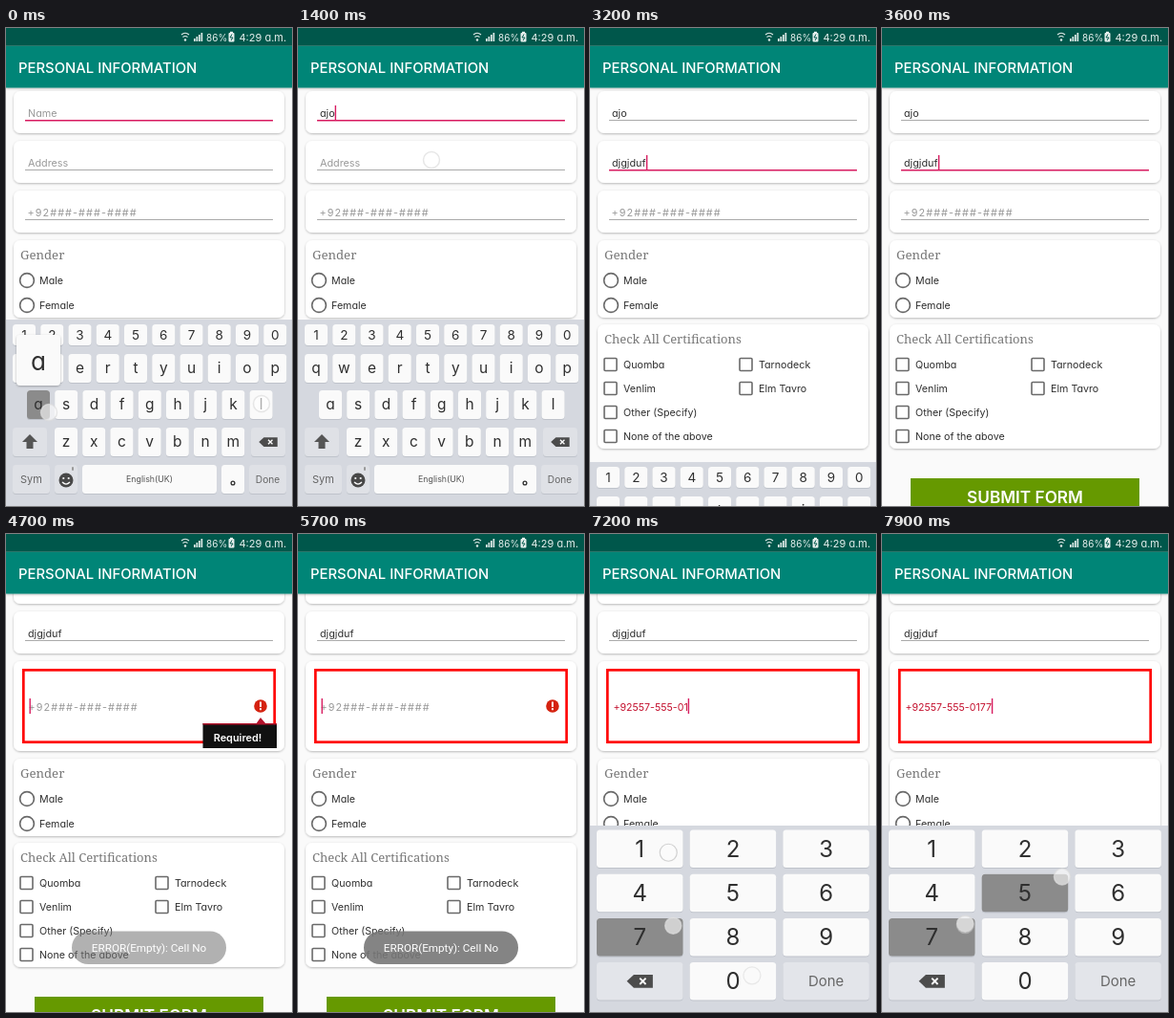
An HTML page that plays this animation: 300x500 px, repeating every 8000 ms.

```html
<!DOCTYPE html>
<html lang="en">
<head>
<meta charset="utf-8">
<title>Personal information form</title>
<style>
html, body { margin: 0; width: 100%; height: 100%; overflow: hidden; background: #fafafa; }
svg { display: block; width: 100vw; height: 100vh; }
text { font-family: Inter, "Open Sans", sans-serif; font-feature-settings: "cv11"; white-space: pre; }
.serif { font-family: "Noto Serif", serif; }
.toast { font-family: Roboto, sans-serif; }
</style>
</head>
<body>
<svg id="stage" viewBox="0 0 300 500"></svg>
<script>
const LOOP = 8000;
const DARK = '#2f2f2f', HINT = '#999', ACCENT = '#d81b60';
const NAME = 'ajo', ADDRESS = 'djgjduf', DIGITS = '5575550177', MASK = '+92###-###-####';

// Markup helpers
const rect = (x, y, w, h, fill, r = 0, extra = '') =>
  `<rect x="${x}" y="${y}" width="${w}" height="${h}" rx="${r}" fill="${fill}" ${extra}/>`;
const text = (x, y, size, str, fill = DARK, extra = '') =>
  `<text x="${x}" y="${y}" font-size="${size}" fill="${fill}" ${extra}>${str}</text>`;
const path = (d, fill, extra = '') => `<path d="${d}" fill="${fill}" ${extra}/>`;
const circle = (x, y, r, fill, extra = '') => `<circle cx="${x}" cy="${y}" r="${r}" fill="${fill}" ${extra}/>`;
const group = (id, inner) => `<g id="${id}">${inner}</g>`;
const MID = 'text-anchor="middle"';

const card = (y, h) => rect(8, y, 284, h, '#fff', 7, 'filter="url(#shade)"');
const radio = (y, label) =>
  circle(22, y, 7.4, 'none', 'stroke="#6a6a6a" stroke-width="1.7"') + text(35, y + 4, 10.7, label);
const check = (x, y, label) =>
  rect(x - 6.5, y - 6.5, 13, 13, 'none', 1, 'stroke="#6a6a6a" stroke-width="1.6"') +
  text(x + 13.5, y + 4, 10.7, label);

// Keyboards
const keys = {}, pad = {};
const addKey = (set, id, x, y, w, h, size, extra = {}) => { set[id] = { id, x, y, w, h, size, ...extra }; };
[...'1234567890'].forEach((c, i) => addKey(keys, c, 7 + i * 29.25, 310, 24, 22, 13.5));
[...'qwertyuiop'].forEach((c, i) => addKey(keys, c, 7 + i * 29.25, 341, 24, 30, 15.5));
[...'asdfghjkl'].forEach((c, i) => addKey(keys, c, 22 + i * 29.2, 379, 24, 30, 15.5));
[...'zxcvbnm'].forEach((c, i) => addKey(keys, c, 51 + i * 29.2, 418, 24, 30, 15.5));
const soft = { fill: '#dfe1e6', ink: '#666' };
addKey(keys, 'shift', 7, 418, 36, 30, 0, soft);
addKey(keys, 'back', 257, 418, 36, 30, 0, soft);
addKey(keys, 'Sym', 7, 457, 39, 30, 11, soft);
addKey(keys, 'face', 51, 457, 24, 30, 0, soft);
addKey(keys, 'English(UK)', 80, 457, 141, 30, 8.8, { ink: '#555' });
addKey(keys, 'dot', 226, 457, 24, 30, 0);
addKey(keys, 'Done', 255, 457, 39, 30, 10.2, soft);

const padSoft = { fill: '#e3e5ea', ink: '#666' };
['1', '2', '3', '4', '5', '6', '7', '8', '9', 'back', '0', 'Done'].forEach((c, i) => {
  const special = c.length > 1;
  addKey(pad, c, 7 + (i % 3) * 97.7, 309.5 + Math.floor(i / 3) * 46.2, 90.5, 39.5,
    special ? 15 : 24, special ? padSoft : {});
});

const icons = {
  shift: (x, y) => path(`M${x} ${y - 8}l8 8h-4.5v7h-7v-7h-4.5z`, '#555'),
  back: (x, y, w) => `<g transform="translate(${x} ${y}) scale(${w > 50 ? 1.05 : 0.75})">` +
    path('M-13 0l7-6.5h19v13h-19z', '#4c4c4c') +
    path('M0-3l6 6m0-6l-6 6', 'none', 'stroke="#fff" stroke-width="1.8"') + '</g>',
  face: (x, y) => circle(x, y + 1, 7.5, '#484848') + circle(x - 2.7, y - 1, 1.1, '#fff') +
    circle(x + 2.7, y - 1, 1.1, '#fff') +
    path(`M${x - 4} ${y + 3}q4 4 8 0`, 'none', 'stroke="#fff" stroke-width="1.2"') +
    rect(x + 6, y - 13, 2, 4, '#999', 1),
  dot: (x, y) => circle(x, y + 4, 1.9, 'none', `stroke="${DARK}" stroke-width="1.3"`)
};

function drawKey(k, down) {
  const cx = k.x + k.w / 2, cy = k.y + k.h / 2;
  const face = rect(k.x, k.y + 1, k.w, k.h, '#bfc3cb', 3.5) +
    rect(k.x, k.y, k.w, k.h, down ? '#8b8b8b' : k.fill || '#fafafa', 3.5);
  return face + (icons[k.id] ? icons[k.id](cx, cy, k.w)
    : text(cx, cy + k.size * 0.35, k.size, k.id, k.ink || DARK, MID));
}
const board = set => rect(0, 305, 300, 196, '#d5d8df') + Object.values(set).map(k => drawKey(k)).join('');

function bubble(k) {
  const cx = k.x + k.w / 2, y = k.y - 58;
  return rect(cx - 23, y, 46, 53, '#fafafa', 4, 'filter="url(#shade)"') + text(cx, y + 36.5, 26, k.id, DARK, MID);
}

// Key presses: start, end, key, finger offset from the key centre
const typing = [
  [-100, 100, 'a', 11, 8], [120, 300, 'j', 3, 0], [600, 800, 'o', -2, 4],
  [1800, 1900, 'd', -4, 2], [1900, 2000, 'j', 4, -6], [2020, 2110, 'g', -3, 0], [2150, 2250, 'j', -18, -15],
  [2290, 2400, 'd', -6, -1], [2450, 2600, 'u', 2, 5], [2690, 2800, 'f', -5, -1]
];
const dialing = [
  [6300, 6400, '5', 24, -2], [6430, 6540, '5', 26, -4], [6560, 6690, '7', 32, -6], [6700, 6800, '5', 28, -6],
  [6800, 6890, '5', 30, -8], [6900, 6990, '5', 32, -8], [7000, 7080, '0', 20, -6], [7100, 7180, '1', 30, 4],
  [7200, 7290, '7', 35, -12], [7700, 7790, '7', 35, -13], [7820, 8010, '7', 35, -14], [7850, 8010, '5', 39, -17]
];
// Other taps: start, end, x, y
const taps = [[-20, 60, 268, 393], [1400, 1500, 140, 138], [3900, 4050, 190, 488], [5300, 5420, 150, 182]];

const stage = document.getElementById('stage');
stage.innerHTML = `
<defs><filter id="shade" x="-10%" y="-20%" width="120%" height="150%">
  <feDropShadow dx="0" dy="0.9" stdDeviation="1.1" flood-color="#000" flood-opacity=".28"/></filter></defs>` +
  rect(0, 0, 300, 500, '#fafafa') +
  group('page',
    card(66, 44) + group('name', '') + card(118, 44) + group('address', '') + group('cell', '') +
    group('lower',
      card(222, 81) + text(15, 242, 13.2, 'Gender', '#777', 'class="serif"') +
      radio(264, 'Male') + radio(290, 'Female') +
      card(310, 130) + text(15, 330, 13, 'Check All Certifications', '#777', 'class="serif"') +
      check(21.5, 352, 'Quomba') + check(163.5, 352, 'Tarnodeck') +
      check(21.5, 377, 'Venlim') + check(163.5, 377, 'Elm Tavro') +
      check(21.5, 402, 'Other (Specify)') + check(21.5, 427, 'None of the above') +
      rect(30, 471, 240, 38, '#669900', 0, 'id="submit"') +
      text(150, 497, 17.2, 'SUBMIT FORM', '#fff', MID + ' font-weight="600"')) +
    group('error',
      path('M262 236l5-7 6 7z', '#b3122b') + rect(206.5, 235, 77.5, 26, '#111') +
      rect(206.5, 235, 77.5, 1.5, '#b3122b') +
      text(243, 254, 10.9, 'Required!', '#fff', MID + ' font-weight="600"'))) +
  group('toast', rect(69, 415.5, 162, 34.5, '#777', 17, 'opacity=".9"') +
    text(150, 437.3, 11.7, 'ERROR(Empty): Cell No', '#fff', MID + ' class="toast"')) +
  rect(0, 18.75, 300, 43.75, '#008577', 0, 'filter="url(#shade)"') + rect(0, 0, 300, 18.75, '#00574b') +
  text(13, 47, 14.85, 'PERSONAL INFORMATION', '#fff', 'font-weight="500"') +
  path('M184 7q4-3.5 8 0M185.500 9.500q2.500-2 5 0', 'none', 'stroke="#dfe9e7" stroke-width="1.2"') +
  circle(188, 12.5, 1.2, '#dfe9e7') +
  [0, 1, 2, 3].map(i => rect(197 + i * 2.5, 11 - i * 2, 1.7, 3 + i * 2, '#dfe9e7')).join('') +
  text(210, 13.5, 10, '86%', '#e6efed') + rect(233.5, 5, 6, 9.500, '#e6efed', 1) +
  rect(235, 3.8, 3, 1.5, '#e6efed') + path('M237 6.500l-2 3.500h3l-2 3', 'none', 'stroke="#00574b" stroke-width="1"') +
  text(244.5, 13.5, 11, '4:29 a.m.', '#e6efed') +
  group('letters', board(keys)) + group('numbers', board(pad)) + group('touch', '');

const nodes = Object.fromEntries(
  ['page', 'name', 'address', 'cell', 'lower', 'submit', 'error', 'toast', 'letters', 'numbers', 'touch']
    .map(id => [id, document.getElementById(id)]));

// Keep markup untouched while nothing changes
const cache = {};
function put(id, markup) {
  if (cache[id] !== markup) nodes[id].innerHTML = cache[id] = markup;
}
const shift = (id, y) => nodes[id].setAttribute('transform', `translate(0 ${y})`);
const fade = (id, a) => nodes[id].setAttribute('opacity', a);
const ramp = (t, a, b) => Math.min(1, Math.max(0, (t - a) / (b - a)));
const ease = (t, a, b) => { const p = ramp(t, a, b); return p * p * (3 - 2 * p); };

const ruler = document.createElement('canvas').getContext('2d');
function caret(x, y, str, size) {
  ruler.font = `${size}px Inter, "Open Sans", sans-serif`;
  return rect(x + ruler.measureText(str).width + 0.5, y - 12, 1.4, 16, ACCENT);
}

const maskText = (x, y) => text(x, y, 10.8, MASK, HINT, 'letter-spacing="1.1"');

function field(y, str, hint, focus, blink) {
  const label = str ? text(23, y, 10.8, str) : hint === MASK ? maskText(22.5, y) : text(23, y, 10.8, hint, HINT);
  return label + rect(20, y + 3, 260, focus ? 1.5 : 1, focus ? ACCENT : '#aaa') +
    (blink ? caret(23, y, str, 10.8) : '');
}

function phone(n) {
  const d = DIGITS.slice(0, n);
  return '+92' + [d.slice(0, 3), d.slice(3, 6), d.slice(6)].filter(Boolean).join('-');
}

function cell(t, grown) {
  if (!grown) return card(170, 44) + field(197, '', MASK, false, false);
  const n = Math.min(10, dialing.filter(p => p[1] <= t).length + (t >= 7820 ? 1 : 0));
  const str = n ? phone(n) : '';
  return card(170, 94) + rect(18.3, 179.3, 263.4, 75.4, '#fff', 0, 'stroke="#f00" stroke-width="2.7"') +
    (n ? text(24.5, 221.5, 10.6, str, '#c4122f')
      : maskText(23.5, 221.5) +
        circle(267, 217, 6.8, '#d5220f') + rect(266, 212.5, 2, 5.5, '#fff') + rect(266, 219.2, 2, 2, '#fff')) +
    caret(24, 221, str, 10.6);
}

function finger(t, [start, end, x, y]) {
  if (t < start || t > end + 200) return '';
  if (t <= end) {
    return circle(x, y, 8.5, '#fff', 'fill-opacity=".6" stroke="#ddd" stroke-opacity=".7" stroke-width="1.5"');
  }
  const a = 1 - ramp(t, end, end + 200);
  return circle(x, y, 9, '#fff', `fill-opacity="${0.3 * a}" stroke="#ccc" stroke-opacity="${a}" stroke-width="1.2"`);
}

function presses(t, list, set, bubbles) {
  const down = list.filter(p => t >= p[0] && t < p[1]).map(p => set[p[2]]);
  const fingers = list.map(([a, b, id, dx, dy]) => {
    const k = set[id];
    return finger(t, [a, b, k.x + k.w / 2 + dx, k.y + k.h / 2 + dy]);
  });
  return down.map(k => drawKey(k, true)).join('') + (bubbles ? down.map(bubble).join('') : '') + fingers.join('');
}

function render(t) {
  const count = (from, to) => typing.filter(p => p[1] >= from && p[1] <= Math.min(t, to)).length;
  const onName = t < 1500, grown = t >= 4200, onAddress = !onName && !grown;
  put('name', field(93, NAME.slice(0, count(0, 1000)), 'Name', onName, onName && t >= 100));
  put('address', field(145, ADDRESS.slice(0, count(1800, 2900)), 'Address', onAddress, onAddress));
  put('cell', cell(t, grown));
  shift('page', -37 * ease(t, 4200, 4450));
  shift('lower', grown ? 50 : 0);
  nodes.submit.setAttribute('fill', t >= 3900 && t < 4100 ? '#578300' : '#669900');
  fade('error', ramp(t, 4400, 4550) * (1 - ramp(t, 5350, 5450)));
  fade('toast', ramp(t, 4500, 4820) * (1 - ramp(t, 5900, 6100)));
  shift('letters', 200 * ease(t, 3000, 3300));
  shift('numbers', 200 * (1 - ease(t, 5800, 6100)));
  put('touch', (t < 3000 ? presses(t, typing, keys, true) : '') +
    (t > 6200 ? presses(t, dialing, pad, false) : '') + taps.map(p => finger(t, p)).join(''));
}

const begin = performance.now();
function tick() {
  render((performance.now() - begin) % LOOP);
  requestAnimationFrame(tick);
}
tick();
</script>
</body>
</html>
```
